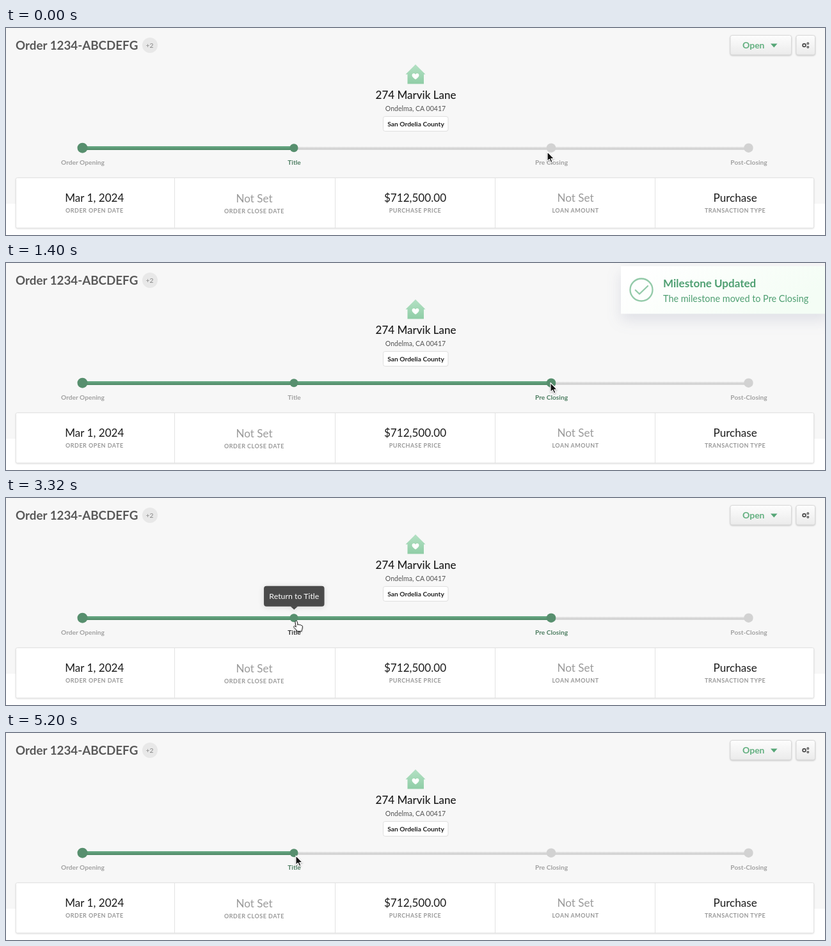
These frames come from a looping animation (1280x324 px, 5.28 s). An HTML page:

```html
<!DOCTYPE html>
<html lang="en">
<head>
<meta charset="utf-8">
<title>Order milestones</title>
<style>
  html, body { margin: 0; width: 100%; height: 100%; overflow: hidden; background: #fff; }
  svg { display: block; width: 1280px; height: 324px; font-family: Lato, sans-serif; }
  .mid { text-anchor: middle; }
  .value { font-size: 17.1px; fill: #1c1c1c; }
  .unset { fill: #9b9b9b; }
  .caption { font-size: 9px; font-weight: 700; letter-spacing: .5px; fill: #999; }
  .step { font-size: 10.2px; font-weight: 700; }
  .tip text { font-size: 12.35px; fill: #fff; }
  .tip { fill: #4a4a4a; filter: drop-shadow(0 1px 4px rgba(0,0,0,.13)); }
  .button { fill: url(#button); stroke: #d9d9d9; filter: drop-shadow(0 1px 1px rgba(0,0,0,.2)); }
</style>
</head>
<body>
<svg viewBox="0 0 1280 324">
  <defs>
    <linearGradient id="button" x2="0" y2="1"><stop stop-color="#fdfdfd"/><stop offset="1" stop-color="#ebebeb"/></linearGradient>
    <linearGradient id="house" x2="0" y2="1"><stop stop-color="#b4e1c4"/><stop offset="1" stop-color="#8fcda6"/></linearGradient>
    <linearGradient id="fill" x2="0" y2="1"><stop stop-color="#6aac87"/><stop offset="1" stop-color="#4f8866"/></linearGradient>
    <linearGradient id="track" x2="0" y2="1"><stop stop-color="#e8e8e8"/><stop offset="1" stop-color="#c7c7c7"/></linearGradient>
    <linearGradient id="toastFill" x2="1" y2=".3"><stop offset=".1" stop-color="#fff"/><stop offset="1" stop-color="#f4fdf5"/></linearGradient>
  </defs>

  <rect width="1280" height="275" fill="#f7f7f7"/>

  <text x="15" y="34" font-size="18.8" font-weight="700" fill="#595959">Order 1234-ABCDEFG</text>
  <circle cx="225" cy="27" r="12" fill="#e8e8e8"/>
  <text class="mid" x="224.5" y="30.5" font-size="10.3" fill="#858585">+2</text>

  <rect class="button" x="1132" y="11.5" width="95.5" height="30.5" rx="3"/>
  <text x="1151" y="32" font-size="14" font-weight="700" fill="#63b080">Open</text>
  <path d="M1195 24.5h10.5l-5.25 6z" fill="#55a676"/>
  <rect class="button" x="1235" y="11.5" width="29.5" height="30.5" rx="3"/>
  <g fill="none" stroke="#4a4a4a">
    <circle cx="1247.5" cy="27" r="2.4" stroke-width="1.7"/>
    <circle cx="1253.3" cy="24.2" r="1.3" stroke-width="1.2"/>
    <circle cx="1253.3" cy="29.8" r="1.3" stroke-width="1.2"/>
  </g>

  <path d="M640 57l15.5 15.5h-2.5V87.5h-25.5V72.5h-3z" fill="url(#house)"/>
  <path d="M640 80.5c-3-2.2-5.5-4-5.5-6.5 0-3.5 4.2-4 5.5-1.2 1.3-2.8 5.5-2.3 5.5 1.2 0 2.5-2.5 4.3-5.5 6.5z" fill="#fff"/>
  <text class="mid" x="640.5" y="110.5" font-size="17" font-weight="500" fill="#1c1c1c">274 Marvik Lane</text>
  <text class="mid" x="640" y="129.5" font-size="10.55" fill="#555">Ondelma, CA 00417</text>
  <rect x="589.5" y="138.5" width="101.5" height="23" rx="3" fill="#fff" stroke="#dedede"/>
  <text class="mid" x="640.5" y="153.5" font-size="10.3" font-weight="700" fill="#222">San Ordelia County</text>

  <rect x="119" y="186" width="1041" height="4.5" fill="url(#track)"/>
  <rect id="preview" x="450" y="185.5" width="402" height="5"/>
  <rect id="bar" x="119" y="185" height="6" fill="url(#fill)"/>
  <g id="steps"></g>

  <rect x="15.5" y="234.5" width="1247" height="78.5" rx="2" fill="#fff" stroke="#e2e2e2" style="filter:drop-shadow(0 1px 1px rgba(0,0,0,.12))"/>
  <g id="cards"></g>
  <g id="tips"></g>

  <g id="toast">
    <rect y="5" width="325" height="74.5" fill="url(#toastFill)" style="filter:drop-shadow(0 10px 11px rgba(70,75,120,.13))"/>
    <g fill="none" stroke="#93caa9" stroke-width="2.3" stroke-linecap="round" stroke-linejoin="round">
      <circle cx="32" cy="42" r="17.5"/>
      <path d="M22.8 42.5l6.2 6 13-12.5"/>
    </g>
    <g fill="#4f9f72">
      <text x="66" y="37.5" font-size="17.05" font-weight="700">Milestone Updated</text>
      <text id="message" x="66" y="61" font-size="14.4"></text>
    </g>
  </g>

  <g id="cursor" stroke-linejoin="round" style="filter:drop-shadow(0 1px 1px rgba(0,0,0,.3))">
    <path id="arrow" d="M0 0V14.5L3.3 11.4 5.6 16.5 8 15.5 5.8 10.5H10.3Z" fill="#111" stroke="#fff" stroke-width="1.1"/>
    <path id="hand" d="M-1 2C-1 0 2 0 2.2 2L3 7C3.5 5.5 5.4 5.6 5.7 7 6.3 6 8 6.3 8.2 7.7 9 7 10.3 7.5 10.3 9 10.5 12 9.5 13.5 9 16.5H2C1 14-1 12.5-3 10.5-4.2 9-2.5 7.8-1 9L.3 10Z" fill="#fff" stroke="#222"/>
  </g>
</svg>

<script>
const LOOP = 5280;
const GREEN = '#578f6e', GRAY = '#d2d2d2', DIM = '#a2a2a2', LIT = '#4f7f63', DARK = '#333333';
const TITLE_X = 450, PRE_X = 852;
const HOVER_GO = 60, CLICK_GO = 814, HOVER_BACK = 2920, CLICK_BACK = 3476;
const TOAST_X = 961, TOAST_W = 325, SLIDE = 360, LEAVE = 300;

// time, x, y of the pointer tip
const PATH = [
  [0, 846, 194], [40, 848, 191], [120, 851, 187.5], [2340, 851, 187.5],
  [2440, 800, 214], [2560, 695, 239], [2680, 580, 238], [2760, 507, 226],
  [2840, 464, 201], [2920, 453, 192], [LOOP, 453, 192]
];

const $ = id => document.getElementById(id);

function add(parent, tag, attrs, text = '') {
  const el = document.createElementNS('http://www.w3.org/2000/svg', tag);
  for (const key in attrs) el.setAttribute(key, attrs[key]);
  el.textContent = text;
  parent.append(el);
  return el;
}

const ramp = (t, start, span) => Math.min(1, Math.max(0, (t - start) / span));

function mix(a, b, k) {
  const part = (hex, i) => parseInt(hex.substr(1 + 2 * i, 2), 16);
  return '#' + [0, 1, 2].map(i =>
    Math.round(part(a, i) + (part(b, i) - part(a, i)) * k).toString(16).padStart(2, '0')).join('');
}

function along(points, t) {
  const i = Math.max(1, points.findIndex(p => p[0] > t));
  const [a, b] = [points[i - 1], points[i]];
  const k = ramp(t, a[0], b[0] - a[0]);
  return [a[1] + (b[1] - a[1]) * k, a[2] + (b[2] - a[2]) * k];
}

const steps = [
  ['Order Opening', 119.5, 8, GREEN, DIM],
  ['Title', TITLE_X, 6.5, GREEN, LIT],
  ['Pre Closing', PRE_X, 7.3, GRAY, DIM],
  ['Post-Closing', 1160.5, 7.2, GRAY, DIM]
].map(([name, x, r, color, ink]) => ({
  dot: add($('steps'), 'circle', { cx: x, cy: 187.7, r, fill: color }),
  label: add($('steps'), 'text', { class: 'step mid', x: x + .5, y: 213.5, fill: ink }, name)
}));

[
  ['Mar 1, 2024', 'ORDER OPEN DATE', 138.3],
  ['Not Set', 'ORDER CLOSE DATE', 388],
  ['$712,500.00', 'PURCHASE PRICE', 639.5],
  ['Not Set', 'LOAN AMOUNT', 890],
  ['Purchase', 'TRANSACTION TYPE', 1139.6]
].forEach(([value, caption, x], i) => {
  const unset = value === 'Not Set', drop = i === 1 ? .8 : 0;
  add($('cards'), 'text', { class: 'value mid' + (unset ? ' unset' : ''), x, y: 271.7 + drop }, value);
  add($('cards'), 'text', { class: 'caption mid', x, y: 289.3 + drop }, caption);
  if (i) add($('cards'), 'path', { d: `M${Math.floor(13.3 + 250.35 * i) + .5} 235v78`, stroke: '#e2e2e2' });
});

function makeTip(text, x, y, width) {
  const g = add($('tips'), 'g', { class: 'tip' });
  add(g, 'rect', { x: x - width / 2, y, width, height: 32, rx: 4 });
  add(g, 'path', { d: `M${x - 6} ${y + 31.5}h12l-6 5.5z` });
  add(g, 'text', { class: 'mid', x, y: y + 20.6 }, text);
  return g;
}
const goTip = makeTip('Proceed to Pre Closing', 852.5, 142.4, 139);
const backTip = makeTip('Return to Title', 450.3, 137.7, 94.5);

const tipAlpha = (t, hover, click) =>
  ramp(t, hover + 20, 180) * (1 - ramp(t, click, SLIDE) ** 1.3);

const toastShift = (t, enter, leave) =>
  TOAST_W * (1 - ramp(t, enter, SLIDE) + ramp(t, leave, LEAVE) ** 2);

function draw(t) {
  const go = ramp(t, CLICK_GO, SLIDE), back = ramp(t, CLICK_BACK, SLIDE);
  const hoverGo = ramp(t, HOVER_GO, 160), hoverBack = ramp(t, HOVER_BACK, 160);
  const returning = t >= CLICK_BACK;
  const done = go - back;

  $('bar').setAttribute('width', TITLE_X - 119 + (PRE_X - TITLE_X) * done);
  $('preview').setAttribute('fill', returning ? '#5a9a74' : mix('#bfc8d3', '#6f8f88', go * .5));
  $('preview').setAttribute('opacity', returning ? 1 - back : hoverGo);

  const [, title, pre] = steps;
  pre.dot.setAttribute('fill', returning
    ? mix(GREEN, GRAY, back)
    : mix(mix(GRAY, '#b9c2cd', hoverGo), GREEN, go));
  pre.label.setAttribute('fill', returning
    ? mix(LIT, DIM, back)
    : mix(mix(DIM, DARK, hoverGo), LIT, go));
  title.label.setAttribute('fill', returning
    ? mix(DARK, LIT, back)
    : mix(mix(LIT, DIM, go), DARK, hoverBack));

  goTip.setAttribute('opacity', tipAlpha(t, HOVER_GO, CLICK_GO));
  backTip.setAttribute('opacity', tipAlpha(t, HOVER_BACK, CLICK_BACK));

  const shift = t < 3000 ? toastShift(t, CLICK_GO, 2300) : toastShift(t, CLICK_BACK, 4900);
  $('toast').setAttribute('transform', `translate(${TOAST_X + shift})`);
  $('toast').setAttribute('visibility', shift >= TOAST_W ? 'hidden' : 'visible');
  $('message').textContent = 'The milestone ' + (t < 3000 ? 'moved to Pre Closing' : 'returned to Title');

  const [x, y] = along(PATH, t);
  const hand = t >= 80 && t < CLICK_GO || t >= HOVER_BACK && t < CLICK_BACK;
  $('cursor').setAttribute('transform', `translate(${x} ${y})`);
  $('arrow').setAttribute('visibility', hand ? 'hidden' : 'visible');
  $('hand').setAttribute('visibility', hand ? 'visible' : 'hidden');
}

const start = performance.now();
function tick() {
  draw((performance.now() - start) % LOOP);
  requestAnimationFrame(tick);
}
tick();
</script>
</body>
</html>
```
